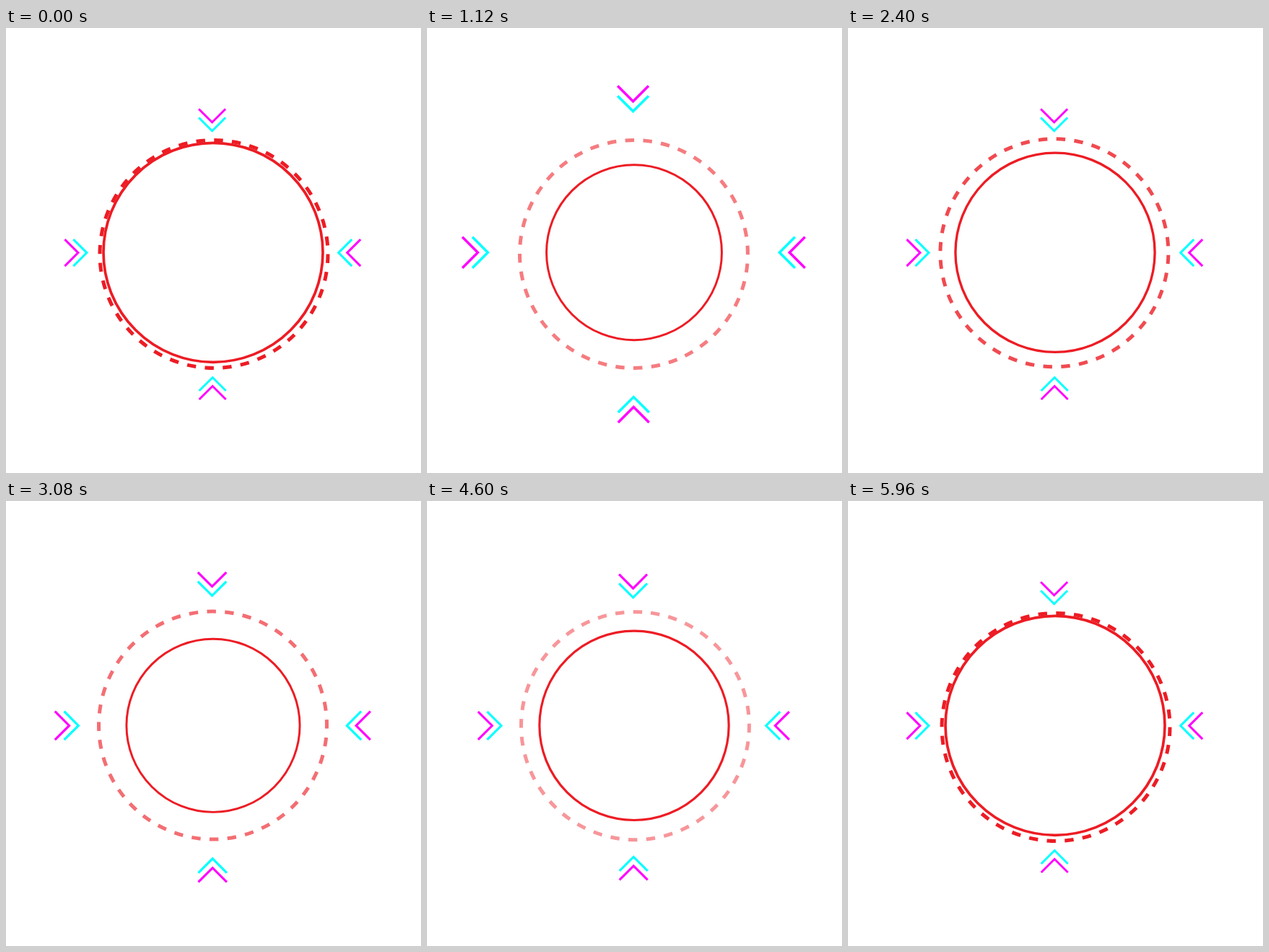
Write an HTML page with a canvas that moves like this. It is 575 by 617 pixels and loops after 6000 ms.

```html
<!DOCTYPE html>
<html lang="en">
<head>
<meta charset="utf-8">
<title>Pulsing ring</title>
<style>
  html, body { margin: 0; width: 575px; height: 617px; overflow: hidden; background: #fff; }
  canvas { display: block; }
</style>
</head>
<body>
<canvas id="stage" width="575" height="617"></canvas>
<script>
const ctx = document.getElementById('stage').getContext('2d');
const LOOP = 6000, STEP = 40, TURN = LOOP - STEP;
const RED = '#ed1c24', CYAN = '#00ffff', MAGENTA = '#ff00ff';

// Inner tips of the chevrons, clockwise from the top.
const TIPS = [[285.6, 142.7], [460.7, 311.6], [286.2, 484.5], [111.9, 311.6]];
// Dash opacity at evenly spaced moments of one turn.
const FADE = [1, 0.55, 0.8, 0.52, 0.45, 1];

// Shrinks and grows back at a steady speed every two seconds.
function circleRadius(t) {
  return 117.3 + 34.7 * Math.abs(1 - (t % 2000) / 1000);
}

// Rises in one second, falls a little slower, then rests.
function pulse(t) {
  return Math.max(0, Math.min(t / 1000, (2280 - t) / 1280));
}

function chevronScale(t) {
  return 1 + 0.175 * (pulse(t) + pulse(t - 2700));
}

function dashOpacity(t) {
  const x = t / TURN * (FADE.length - 1), i = Math.floor(x);
  return FADE[i] + (FADE[i + 1] - FADE[i]) * (x - i);
}

function strokeCircle(x, y, r, width) {
  ctx.beginPath();
  ctx.arc(x, y, r, 0, Math.PI * 2);
  ctx.strokeStyle = RED;
  ctx.lineWidth = width;
  ctx.stroke();
}

// The ring turns around a point slightly off its own centre.
function drawDashes(t) {
  const r = 158, dash = Math.PI * r / 40;
  ctx.save();
  ctx.translate(287.2, 312.3);
  ctx.rotate(Math.PI * 2 * t / TURN);
  ctx.globalAlpha = dashOpacity(t);
  ctx.setLineDash([dash, dash]);
  strokeCircle(0.8, 1.15, r, 5);
  ctx.restore();
}

function drawCircle(t) {
  const r = circleRadius(t);
  strokeCircle(287, 311.3, r, 3.7 * r / 152);
}

function strokeChevron(color, y) {
  const arm = 18.5;
  ctx.strokeStyle = color;
  ctx.beginPath();
  ctx.moveTo(-arm, y - arm);
  ctx.lineTo(0, y);
  ctx.lineTo(arm, y - arm);
  ctx.stroke();
}

function drawChevrons(t) {
  const k = chevronScale(t), cx = 286, cy = 313.7;
  ctx.lineWidth = 3;
  TIPS.forEach(([x, y], side) => {
    ctx.save();
    ctx.translate(cx + (x - cx) * k, cy + (y - cy) * k);
    ctx.scale(k, k);
    ctx.rotate(side * Math.PI / 2);
    strokeChevron(MAGENTA, -12);
    strokeChevron(CYAN, 0);
    ctx.restore();
  });
}

function draw(now) {
  // The last step of the loop shows the starting pose again.
  const t = Math.floor((now % LOOP) / STEP) * STEP % TURN;
  ctx.fillStyle = '#fff';
  ctx.fillRect(0, 0, 575, 617);
  drawDashes(t);
  drawCircle(t);
  drawChevrons(t);
}

function tick(now) {
  draw(now);
  requestAnimationFrame(tick);
}

draw(0);
requestAnimationFrame(tick);
</script>
</body>
</html>
```
